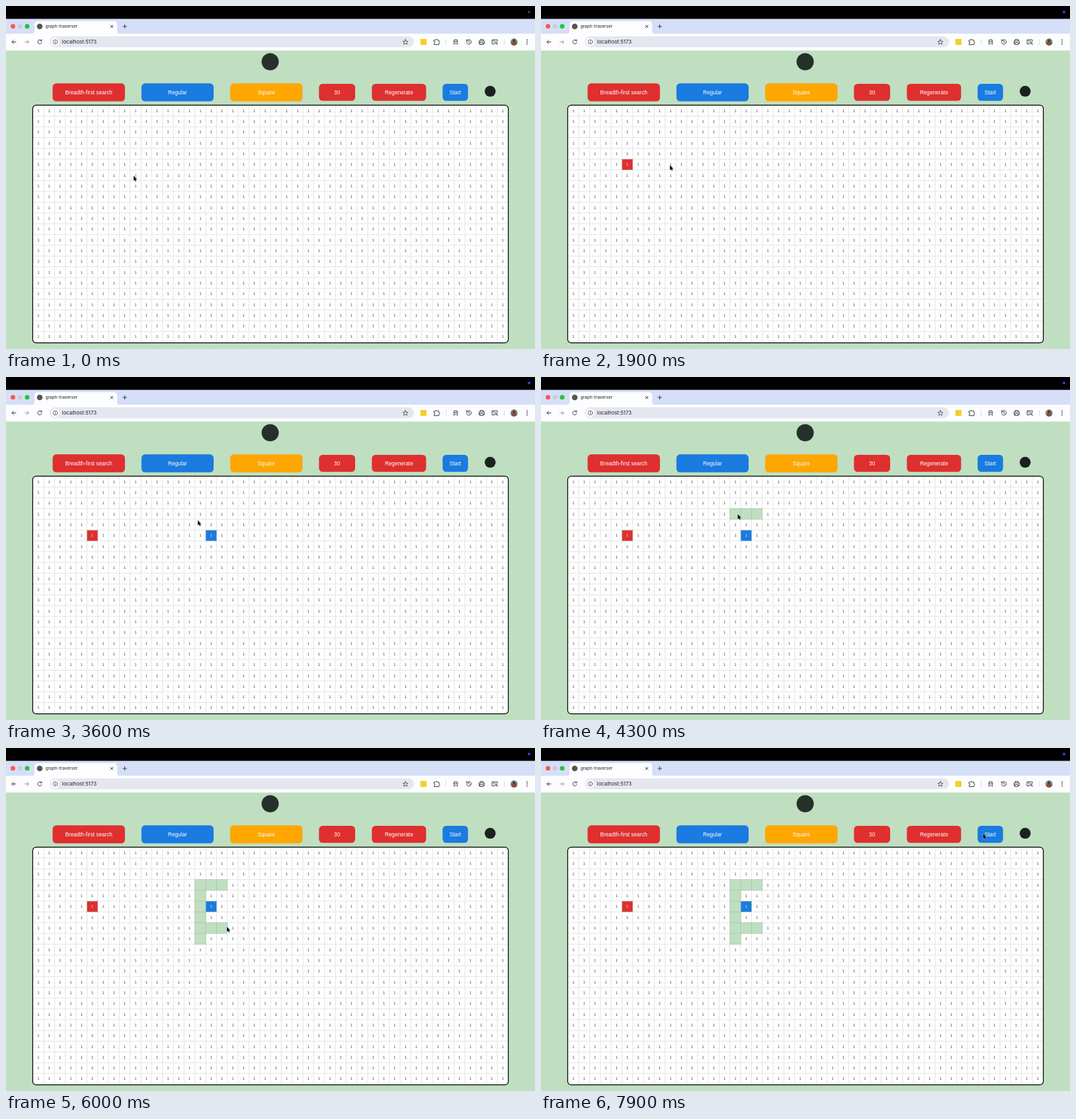
An HTML page that plays this animation: 800 px wide and 520 px high, repeating every 8000 ms.

```html
<!DOCTYPE html>
<html lang="en">
<head>
<meta charset="utf-8">
<title>graph-traverser</title>
<style>
  html, body { margin: 0; width: 100%; height: 100%; overflow: hidden; background: #bfdfc0; }
  svg { display: block; width: 800px; height: 520px; }
  .ui { font-family: Inter, "Open Sans", sans-serif; fill: #202124; }
  .page { font-family: "Liberation Sans", Arial, sans-serif; }
  .label { font-size: 8.2px; fill: #fff; text-anchor: middle; }
  .digit { font-size: 5.4px; fill: #333; text-anchor: middle; }
  .icon { fill: none; stroke: #3c4043; stroke-width: 1; stroke-linecap: round; stroke-linejoin: round; }
  .dot { fill: #3b3be0; animation: wake 8s step-end infinite; }
  @keyframes wake { 0% { fill: #3a3a3a; } 2.5% { fill: #3b3be0; } }
</style>
</head>
<body>
<svg viewBox="0 0 800 520">
  <rect width="800" height="520" fill="#bfdfc0"/>

  <g class="ui">
    <rect width="800" height="20" fill="#000"/>
    <circle class="dot" cx="791" cy="9" r="2.1"/>
    <rect y="19.5" width="800" height="23" fill="#d5dff8"/>
    <rect y="42" width="800" height="25.5" fill="#fdfdff"/>
    <path d="M38 42.5Q43 42.5 43 38V28Q43 23 48 23H163Q168 23 168 28V38Q168 42.5 173 42.5Z" fill="#fdfdff"/>
    <circle cx="10.5" cy="30.8" r="3.5" fill="#fb5750"/>
    <circle cx="21.3" cy="30.8" r="3.5" fill="#cbcdd2"/>
    <circle cx="32" cy="30.8" r="3.5" fill="#27c33f"/>
    <circle cx="51" cy="31" r="4.3" fill="#555"/>
    <text x="59.7" y="33.3" font-size="6.5">graph-traverser</text>
    <rect x="66" y="46" width="551" height="16.5" rx="8.2" fill="#e5e7f0"/>
    <circle cx="74.5" cy="54.4" r="6.3" fill="#fff"/>
    <text x="84.8" y="57.1" font-size="7.75">localhost:5173</text>

    <g class="icon">
      <path d="M158 29.2l3.8 3.8m0-3.8l-3.8 3.8M176.8 31h5.6m-2.8-2.8v5.6"/>
      <path d="M15 54.5H9m2.8-2.8L9 54.5l2.8 2.8"/>
      <path d="M28.5 54.5h6m-2.8-2.8l2.8 2.8-2.8 2.8" stroke="#9a9da2"/>
      <path d="M53.4 52.3a3.1 3.1 0 1 0 .7 2.9M54 50.9v2h-2"/>
      <circle cx="74.5" cy="54.4" r="3.3" stroke-width=".8"/>
      <path d="M74.5 54.2v1.8m0-3.3v.1" stroke-width=".9"/>
      <path d="M604 50.7l1.1 2.6 2.8.2-2.1 1.8.7 2.8-2.5-1.5-2.5 1.5.7-2.8-2.1-1.8 2.8-.2z" stroke-width=".8"/>
      <path d="M647.5 51.8h2.2a1.2 1.2 0 0 1 2.6 0h2.4v2.3a1.2 1.2 0 0 1 0 2.5v2h-7.2v-2a1.2 1.2 0 0 0 0-2.5z"/>
      <path d="M677.8 53.5v-2.3h4.4v2.3M676.5 54h7M677.6 55.6v2.8m4.8-2.8v2.8m-3.3-1.6h1.8"/>
      <path d="M696.8 52.7a3.6 3.6 0 1 1-.4 2.2M696.3 50.8v2.1h2.1M700 52.5v2.1l1.5 1"/>
      <path d="M717 52.7v-2h4.6v2M716.7 57h-1.3v-4h8v4h-1.4M717 55.6h4.6v2.8h-4.6z"/>
      <path d="M738.3 57.5h-3.2v-6.3h8v2.3M736.8 53h2"/>
      <circle cx="740.8" cy="55.7" r="1.6"/>
      <path d="M742 56.9l1.7 1.6"/>
    </g>
    <rect x="626.7" y="50" width="9.2" height="9" fill="#f3cf28"/>
    <path d="M665.5 50v9M753.5 50v9" stroke="#cfdcf5"/>
    <circle cx="768.3" cy="54.5" r="5.4" fill="#6f9184"/>
    <path d="M764 57.8a4.3 4.3 0 0 1 8.6 0 5.4 5.4 0 0 1-8.6 0z" fill="#8b4c3b"/>
    <circle cx="768.3" cy="52.8" r="2.2" fill="#5c3a30"/>
    <g fill="#3c4043">
      <circle cx="788" cy="51.4" r=".9"/><circle cx="788" cy="54.5" r=".9"/><circle cx="788" cy="57.6" r=".9"/>
    </g>
  </g>

  <g class="page">
    <circle cx="399.5" cy="84.5" r="13" fill="#26302a"/>
    <g id="buttons"></g>
    <circle cx="732.2" cy="129.3" r="8.3" fill="#1b211f"/>
    <rect x="40.4" y="150.4" width="719.2" height="360.2" rx="5" fill="#fdfefd"/>
    <path id="lines" fill="none" stroke="#dce0dc" stroke-width=".8"/>
    <g id="digits"></g>
    <g id="cells"></g>
    <rect x="40.4" y="150.4" width="719.2" height="360.2" rx="5" fill="none" stroke="#000" stroke-width="1.2"/>
  </g>

  <path id="cursor" d="M0 0V7.5L1.8 6 2.9 8.6 4.2 8 3 5.5H5.3Z" fill="#000" stroke="#fff" stroke-width=".6" paint-order="stroke"/>
</svg>

<script>
const LOOP = 8000, COLS = 44, ROWS = 22, SIZE = 16.33, LEFT = 40.8, TOP = 150.5;
const RED = '#df2f2f', BLUE = '#1a7be0', AMBER = '#ffa600', GREEN = '#bfdfc0';
const DRAG = [4050, 6000];
const $ = id => document.getElementById(id);

function add(parent, tag, attrs, text = '') {
  const el = document.createElementNS('http://www.w3.org/2000/svg', tag);
  for (const key in attrs) el.setAttribute(key, attrs[key]);
  el.textContent = text;
  parent.append(el);
  return el;
}

// x, top, width, height, colour, label
[
  [70.5, 117.3, 109.4, 27.2, RED, 'Breadth-first search'],
  [204.8, 117.3, 109.2, 27.2, BLUE, 'Regular'],
  [339, 117.3, 109.4, 27.2, AMBER, 'Square'],
  [473.3, 118, 54.7, 25.8, RED, '30'],
  [553.3, 118, 82, 25.8, RED, 'Regenerate'],
  [660.3, 118, 38.4, 25.8, BLUE, 'Start']
].forEach(([x, y, width, height, fill, label]) => {
  add($('buttons'), 'rect', { x, y, width, height, rx: 5.5, fill });
  add($('buttons'), 'text', { class: 'label', x: x + width / 2, y: 133.8 }, label);
});

const midX = col => LEFT + (col + .5) * SIZE;
const baseY = row => TOP + (row + .5) * SIZE + 1.9;
let lines = '';
for (let c = 1; c < COLS; c++) lines += `M${LEFT + c * SIZE} ${TOP}v${ROWS * SIZE}`;
for (let r = 1; r < ROWS; r++) lines += `M${LEFT} ${TOP + r * SIZE}h${COLS * SIZE}`;
$('lines').setAttribute('d', lines);
for (let r = 0; r < ROWS; r++)
  for (let c = 0; c < COLS; c++)
    add($('digits'), 'text', { class: 'digit', x: midX(c), y: baseY(r) }, '1');

// Pointer stops: time, x, y
const stops = [
  [0, 193, 257.5], [850, 130, 241.5], [1500, 130, 241.5], [2500, 313.7, 240.7],
  [3150, 313.7, 240.7], [3600, 290, 217.3], [4000, 328, 208], [4400, 292, 208],
  [4900, 288, 237], [5300, 293, 285], [5500, 296, 273], [6000, 334, 271],
  [6500, 334, 271], [7600, 668.7, 130], [LOOP, 668.7, 130]
];

function pointer(t) {
  const i = stops.findIndex(s => s[0] > t);
  const [t0, x0, y0] = stops[i - 1], [t1, x1, y1] = stops[i];
  const p = (t - t0) / (t1 - t0), e = p * p * (3 - 2 * p);
  return [x0 + (x1 - x0) * e, y0 + (y1 - y0) * e];
}

const painted = [];
function paint(col, row, time, fill, digit) {
  const g = add($('cells'), 'g', {});
  add(g, 'rect', {
    x: LEFT + col * SIZE, y: TOP + row * SIZE, width: SIZE, height: SIZE, fill,
    stroke: '#a9bfaa', 'stroke-width': .6
  });
  if (digit) add(g, 'text', { class: 'digit', x: midX(col), y: baseY(row), style: 'fill:#fff' }, '1');
  painted.push({ g, time });
}

// Walls appear in each cell the pointer enters while dragging.
const walls = new Set();
for (let t = DRAG[0]; t <= DRAG[1]; t += 10) {
  const [x, y] = pointer(t);
  const col = Math.floor((x - LEFT) / SIZE), row = Math.floor((y - TOP) / SIZE);
  const key = col + ',' + row;
  if (!walls.has(key)) paint(col, row, t, GREEN);
  walls.add(key);
}
paint(5, 5, 1000, RED, true);
paint(16, 5, 2950, BLUE, true);

const start = performance.now();
function draw(now) {
  const t = Math.max(0, now - start) % LOOP;
  const [x, y] = pointer(t);
  $('cursor').setAttribute('transform', `translate(${x} ${y})`);
  for (const { g, time } of painted) g.style.display = t >= time ? '' : 'none';
  requestAnimationFrame(draw);
}
draw(start);
</script>
</body>
</html>
```
